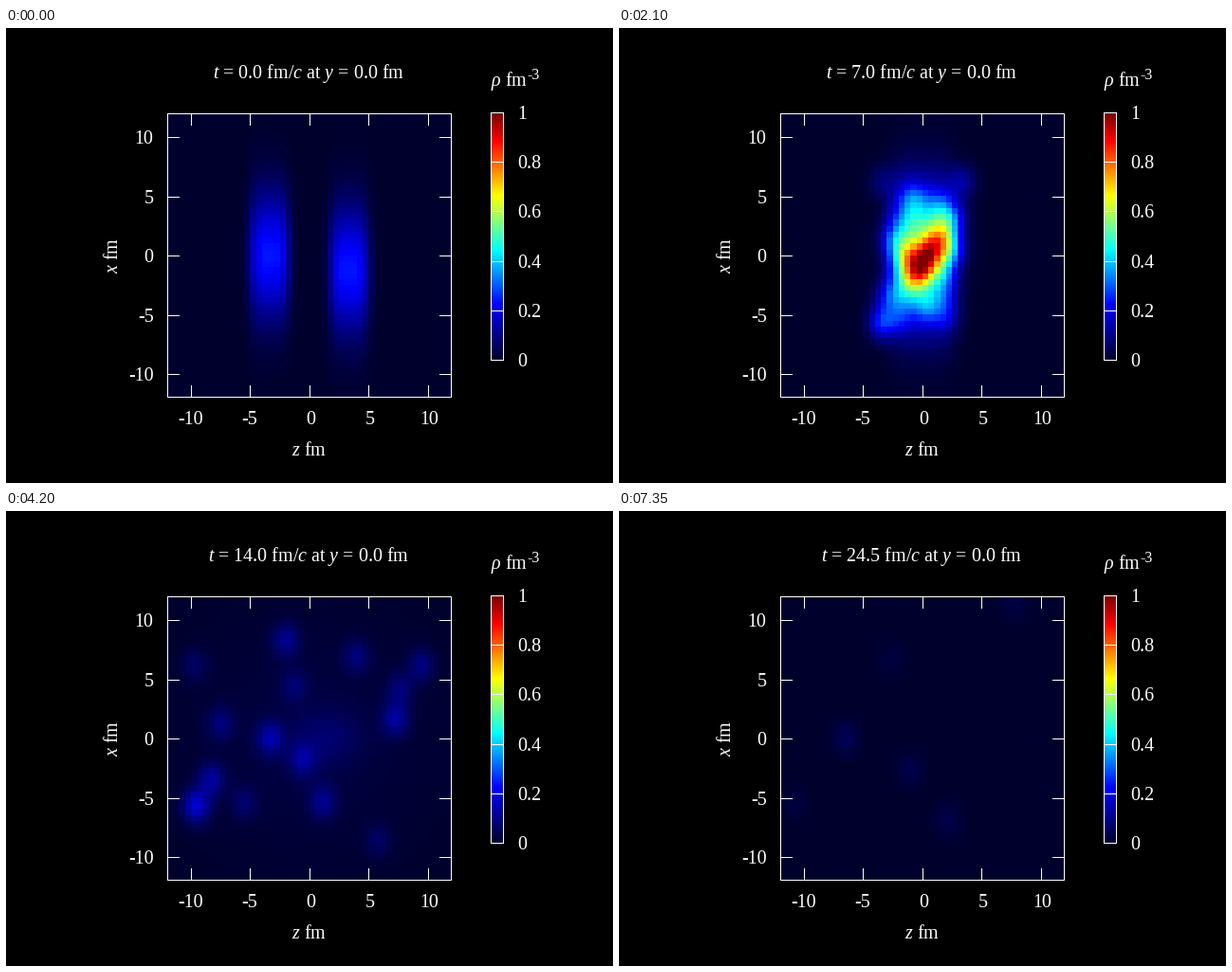
Recreate the animation shown at these times as a matplotlib script. Size 640 by 480 pixels, loop 7500 ms.

```python
import matplotlib.pyplot as plt
import numpy as np
from matplotlib.animation import FuncAnimation
from matplotlib.colors import LinearSegmentedColormap

W, H = 640, 480
FRAMES, STEP = 50, 150
IMPACT = 3      # time of full overlap, fm/c
SPEED = 1.1     # approach speed of each nucleus

plt.rcParams.update({
    "font.family": "Liberation Serif",
    "font.size": 20,
    "text.color": "white",
    "toolbar": "None",
    "mathtext.fontset": "custom",
    "mathtext.rm": "Liberation Serif",
    "mathtext.it": "Liberation Serif:italic",
})

PALETTE = LinearSegmentedColormap.from_list("density", [
    (0, (0, 0, 0.18)), (2 / 9, (0, 0, 1)), (4 / 9, (0, 1, 1)),
    (6 / 9, (1, 1, 0)), (8 / 9, (1, 0, 0)), (1, (0.5, 0, 0))], N=512)

# Free-streaming clumps: z speed, x at impact, x speed, density.
FRAGMENTS = [
    (-.87, -5.7, 0, .23), (-.75, -3.5, 0, .15), (-.68, 1.3, 0, .1),
    (-.88, 6.2, 0, .07), (.86, 6.2, 0, .11), (.7, 2.5, .15, .1),
    (.66, 0, .15, .15), (-.18, 2.8, .5, .13), (.1, -3.7, -.15, .12),
    (.53, -3.1, -.5, .07), (.36, 2.2, .43, .1), (-.3, 0, 0, .16),
    (-.05, -1, -.08, .12), (-.5, -5.4, 0, .08), (-.12, 2, .22, .08)]

axis = np.arange(-11.75, 12, 0.5)
Z, X = np.meshgrid(axis, axis[::-1])


def glow(amp, z, x, width, length, tilt=0, power=2):
    """Soft ellipse; a higher power flattens it across its width."""
    dz, dx = Z - z, X - x
    across = (dz * np.cos(tilt) - dx * np.sin(tilt)) / width
    along = (dz * np.sin(tilt) + dx * np.cos(tilt)) / length
    return amp * np.exp(-np.abs(across) ** power - along ** 2)


def nuclei(t):
    amp = 0.24 + 0.51 * (t / IMPACT) ** 3
    gap = 3.35 - SPEED * t
    return (glow(amp, -gap, 0, 1.7, 5.3, power=4)
            + glow(amp, gap, -1.2, 1.7, 5.3, power=4))


def fireball(age):
    slab = glow(1.5 * np.exp(-(age / 3.8) ** 2), 0, 0,
                1.7 + 0.28 * age, 5.4, power=4)
    core = glow(0.48 * np.exp(-((age - 5) / 4) ** 2), 0.12 * age, 0,
                0.5 + 0.17 * age, 3, tilt=0.13 * age)
    halo = glow(0.06 * np.exp(-((age - 7) / 4) ** 2), 0, 0,
                0.9 * age, 0.9 * age)
    return slab + core + halo


def fragments(age):
    fade = min(1, age / 3) * min(1, 9 / age) ** 1.5
    return sum(glow(amp * fade, vz * age, x + vx * age, 1.1, 1.4)
               for vz, x, vx, amp in FRAGMENTS)


def density(t):
    if t <= IMPACT:
        return nuclei(t)
    age = t - IMPACT
    return fireball(age) + fragments(age)


fig = plt.figure(figsize=(W / 72, H / 72), dpi=72, facecolor="black")
ax = fig.add_axes([0, 0, 1, 1])


def raster(data, extent):
    return ax.imshow(data, cmap=PALETTE, vmin=0, vmax=1, extent=extent,
                     aspect="auto", interpolation="nearest")


def line(xs, ys):
    ax.plot(xs, ys, color="white", lw=1, snap=False,
            solid_capstyle="projecting", solid_joinstyle="miter")


def box(x0, y0, x1, y1):
    line([x0, x1, x1, x0, x0], [y0, y0, y1, y1, y0])


def label(x, y, text, ha="center", **kw):
    return ax.text(x, y, text, ha=ha, va="baseline", **kw)


field = raster(density(0), (170, 470, 390, 90))
raster(np.linspace(1, 0, 260)[:, None], (512, 524, 350, 90))

box(170.5, 90.5, 469.5, 389.5)
for value in range(-10, 11, 5):
    px = int(320 + 12.5 * value) + 0.5
    py = int(240.5 - 12.5 * value) + 0.5
    for a, b in ((90.5, 102.5), (377.5, 389.5)):
        line([px, px], [a, b])
    for a, b in ((170.5, 182.5), (457.5, 469.5)):
        line([a, b], [py, py])
    pad = 2 if value >= 0 else 0
    label(px + pad - 1, 418, str(value))
    label(155.5, py + 6.5, str(value), ha="right")

box(511.5, 89.5, 524.5, 350.5)
for value in (0, 0.2, 0.4, 0.6, 0.8, 1):
    py = int(350.5 - 261 * value) + 0.5
    line([511.5, 524.5], [py, py])
    label(539, py + 6.5, f"{value:g}", ha="left")

label(319, 451, "$z$ fm")
label(118, 240, "$x$ fm", rotation=90, rotation_mode="anchor")
label(511, 61, r"$\rho$ fm", ha="left")
label(549, 54, "-3", ha="left", fontsize=16)
title = label(319, 53, "")

ax.set_xlim(0, W)
ax.set_ylim(H, 0)
ax.axis("off")


def update(i):
    t = i / 2
    field.set_data(density(t))
    title.set_text(f"$t$ = {t:.1f} fm/$c$ at $y$ = 0.0 fm")
    return field, title


anim = FuncAnimation(fig, update, frames=FRAMES, interval=STEP,
                     repeat=True, repeat_delay=0, blit=False)
plt.show()
```
